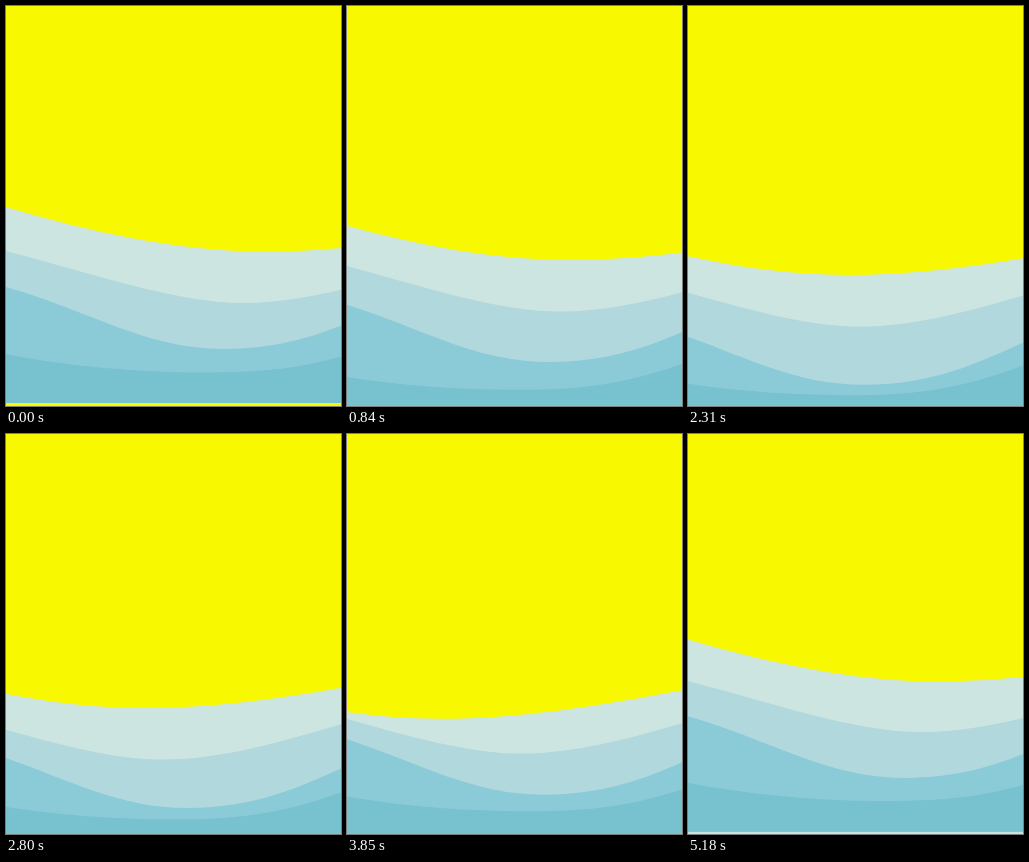
An HTML page that plays this animation: 335 by 400 pixels, repeating every 5250 ms.

```html
<!DOCTYPE html>
<html lang="en">
<head>
<meta charset="utf-8">
<title>Waves</title>
<style>
  html, body { margin: 0; width: 100%; height: 100%; overflow: hidden; background: #f8f800; }
  svg { display: block; }
</style>
</head>
<body>
<svg width="335" height="400" viewBox="0 0 335 400"></svg>
<script>
const LOOP = 5250, STEP = 70;

// Each crest is one smooth trough. The wave slides by (dx, dy) until `peak` ms, then back.
const waves = [
  { color: '#cde5e0', dx: -167, dy: 39.4, peak: 3870,
    crest: 'M0,201 C86,226.3 172,245.5 258,245.5 S426,231 510,215.3' },
  { color: '#b1d8dd', dx: -92, dy: 32.8, peak: 3214,
    crest: 'M0,245 C85,267 170,297 237,297 S375,273 435,256' },
  { color: '#8bcbd8', dx: -44, dy: 36.5, peak: 2360,
    crest: 'M0,281 C87,306 140,343 218,343 S344,315 385,298' },
  { color: '#78c1cf', dx: -54, dy: 29.4, peak: 1430,
    crest: 'M0,348 C60,360 130,366.5 200,366.5 S318,361 395,329.5' }
];

const svg = document.querySelector('svg');
for (const wave of waves) {
  wave.path = document.createElementNS(svg.namespaceURI, 'path');
  wave.path.setAttribute('d', `${wave.crest} V397 H0 Z`);
  wave.path.setAttribute('fill', wave.color);
  svg.append(wave.path);
}

let start;
function draw(now) {
  start ??= now;
  const t = Math.floor((now - start) % LOOP / STEP) * STEP;
  for (const { path, dx, dy, peak } of waves) {
    const k = t < peak ? t / peak : (LOOP - t) / (LOOP - peak);
    path.setAttribute('transform', `translate(${dx * k} ${dy * k})`);
  }
  requestAnimationFrame(draw);
}
requestAnimationFrame(draw);
</script>
</body>
</html>
```
